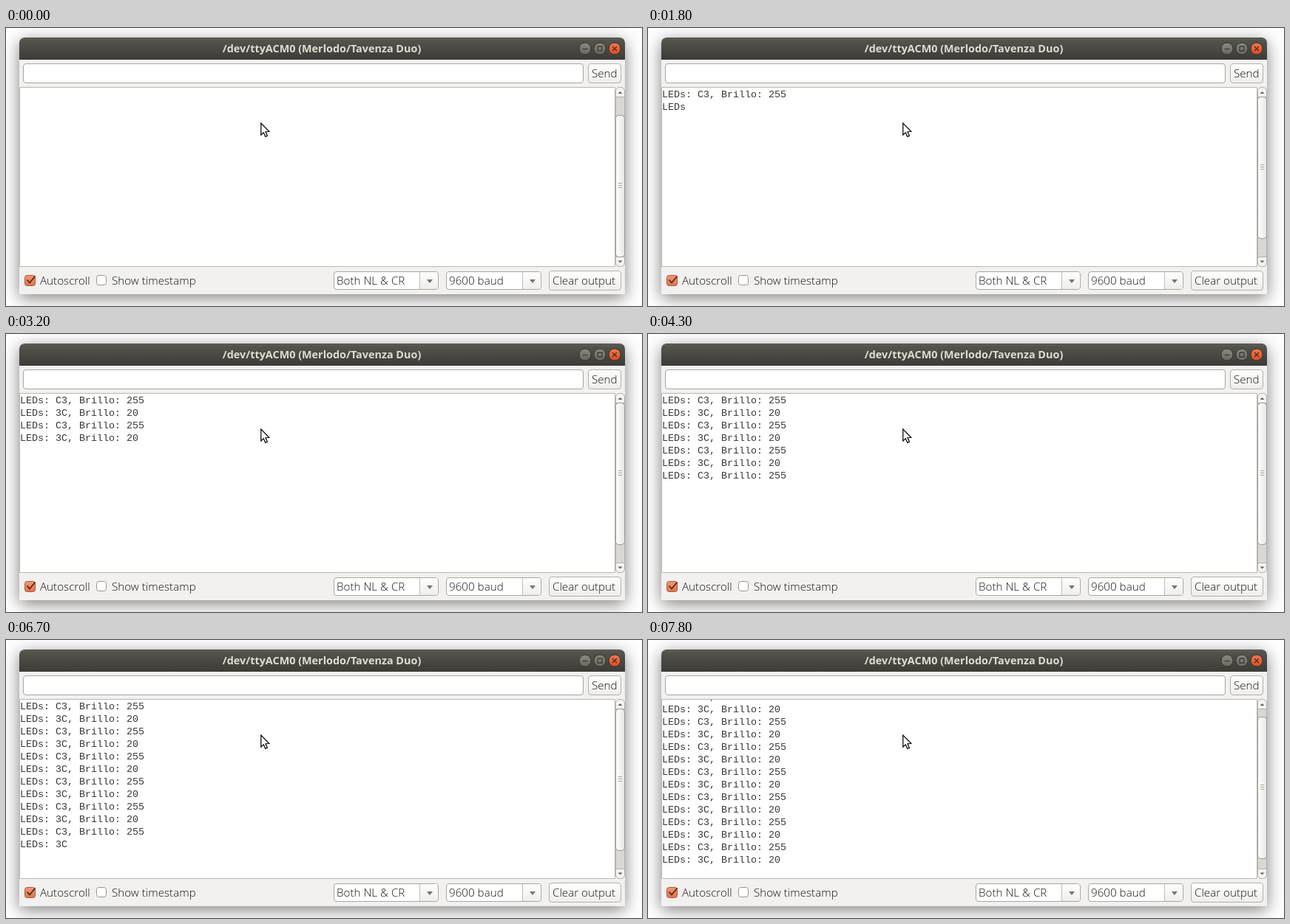
These frames come from a looping animation (860 px wide and 377 px high, 8 s). An HTML page with a canvas:

```html
<!DOCTYPE html>
<html lang="en">
<head>
<meta charset="utf-8">
<title>Serial monitor</title>
<style>
  html, body { margin: 0; width: 100%; height: 100%; overflow: hidden; background: #fff; }
  canvas { display: block; width: 860px; height: 377px; }
</style>
</head>
<body>
<canvas id="stage" width="860" height="377"></canvas>
<script>
const ctx = document.getElementById('stage').getContext('2d');
const LOOP = 8000;
const UI = '"Open Sans", "Noto Sans", sans-serif';
const MONO = '13.33px "Liberation Mono", monospace';
const BORDER = '#aaa59d';

// The board sends a line every 500 ms; a few arrive late, a few in two parts.
const LINES = 14;
const LINE_HEIGHT = 17;
const late = [1, 3, 7];
const firstPart = { 0: 'LEDs: C3,', 1: 'LEDs', 9: 'LEDs: 3C, Brillo:', 11: 'LEDs: 3C', 12: 'LEDs: C3', 13: 'LEDs: 3C' };

function lineAt(i, t) {
  const delay = late.includes(i) ? 400 : 0;
  const done = 1300 + 500 * i + delay;
  if (t >= done) return i % 2 ? 'LEDs: 3C, Brillo: 20' : 'LEDs: C3, Brillo: 255';
  return t >= done - (delay || 100) ? firstPart[i] || '' : '';
}

function vertical(y0, y1, top, bottom) {
  const g = ctx.createLinearGradient(0, y0, 0, y1);
  g.addColorStop(0, top);
  g.addColorStop(1, bottom);
  return g;
}

function box(x, y, w, h, r, fill, stroke) {
  ctx.beginPath();
  ctx.roundRect(x + 0.5, y + 0.5, w - 1, h - 1, r);
  ctx.fillStyle = fill;
  ctx.fill();
  ctx.strokeStyle = stroke;
  ctx.lineWidth = 1;
  ctx.stroke();
}

function path(points, close) {
  ctx.beginPath();
  points.forEach(([x, y]) => ctx.lineTo(x, y));
  if (close) ctx.closePath();
}

function line(color, width, ...points) {
  path(points);
  ctx.strokeStyle = color;
  ctx.lineWidth = width;
  ctx.stroke();
}

function triangle(x, y, w, h, color) {
  path([[x - w, y - h], [x + w, y - h], [x, y + h]], true);
  ctx.fillStyle = color;
  ctx.fill();
}

function label(text, x, y) {
  ctx.font = `300 15.2px ${UI}`;
  ctx.textAlign = 'left';
  ctx.fillStyle = '#161616';
  ctx.fillText(text, x, y);
}

function button(text, x, y, w) {
  box(x, y, w, 27, 3.5, vertical(y, y + 27, '#ffffff', '#eeedeb'), '#b5b0a9');
  label(text, x + 5, y + 19);
}

function combo(text, x, w) {
  const split = x + w - 26;
  box(x, 330, w, 25, 3.5, '#fff', BORDER);
  ctx.fillStyle = vertical(331, 354, '#fefefe', '#efeeec');
  ctx.fillRect(split + 1, 331, 23, 23);
  line('#c2beb8', 1, [split + 0.5, 331], [split + 0.5, 354]);
  triangle(split + 14, 343.5, 4, 2.5, '#777570');
  label(text, x + 4, 348);
}

function titleButton(x, top, bottom, ink, ...strokes) {
  ctx.beginPath();
  ctx.arc(x, 28, 8, 0, Math.PI * 2);
  ctx.fillStyle = vertical(20, 36, top, bottom);
  ctx.fill();
  ctx.strokeStyle = '#35342f';
  ctx.lineWidth = 1;
  ctx.stroke();
  for (const points of strokes) {
    line(ink, 1.3, ...points.map(([dx, dy]) => [x + dx, 28 + dy]));
  }
}

function drawTitleBar() {
  ctx.beginPath();
  ctx.roundRect(18, 13, 819, 30, [7, 7, 0, 0]);
  ctx.fillStyle = vertical(13, 43, '#57564f', '#3c3b37');
  ctx.fill();
  line('#45443f', 1, [24, 13.5], [831, 13.5]);
  line('#66655d', 1, [22, 14.5], [833, 14.5]);
  ctx.font = `bold 14.4px ${UI}`;
  ctx.textAlign = 'center';
  ctx.fillStyle = '#dfdbd2';
  ctx.fillText('/dev/ttyACM0 (Merlodo/Tavenza Duo)', 427, 33);

  const gray = ['#8b8981', '#69675f', '#3b3a36'];
  titleButton(783, ...gray, [[-3.5, 0.5], [3.5, 0.5]]);
  titleButton(803, ...gray, [[-3, -3], [3, -3], [3, 3], [-3, 3], [-3, -3]]);
  titleButton(823, '#f37b52', '#dd4c1f', '#4a2a1d', [[-3, -3], [3, 3]], [[3, -3], [-3, 3]]);
}

function drawWindow() {
  ctx.fillStyle = '#fff';
  ctx.fillRect(0, 0, 860, 377);
  ctx.save();
  ctx.shadowColor = 'rgba(0,0,0,0.5)';
  ctx.shadowBlur = 22;
  ctx.shadowOffsetY = 5;
  ctx.beginPath();
  ctx.roundRect(18, 13, 819, 348, [7, 7, 0, 0]);
  ctx.fillStyle = '#f2f1f0';
  ctx.fill();
  ctx.restore();
  drawTitleBar();

  box(23, 48, 758, 27, 3.5, '#fff', BORDER);
  button('Send', 787, 48, 45);
  box(18, 80, 806, 244, 0, '#fff', '#bbb7b0');
}

function drawFooter() {
  box(25, 335, 15, 15, 3, vertical(335, 350, '#f29a78', '#e56f47'), '#a8583c');
  line('#46291d', 1.7, [28.5, 341.5], [32, 345.5], [39.5, 336.5]);
  label('Autoscroll', 46, 348);
  box(122, 335, 14, 14, 3, '#fff', '#99948c');
  label('Show timestamp', 143, 348);
  combo('Both NL & CR', 443, 142);
  combo('9600 baud', 595, 129);
  button('Clear output', 734, 329, 98);
}

function drawScrollbar(top) {
  box(824, 80, 13, 244, 5, '#dad8d5', '#b5b1aa');
  box(824, 80, 13, 14, [5, 5, 0, 0], '#f4f3f2', '#b5b1aa');
  box(824, 310, 13, 14, [0, 0, 5, 5], '#f4f3f2', '#b5b1aa');
  triangle(830.5, 87.5, 3, -1.5, '#66645f');
  triangle(830.5, 317, 3, 1.5, '#66645f');

  const g = ctx.createLinearGradient(824, 0, 837, 0);
  g.addColorStop(0, '#ffffff');
  g.addColorStop(1, '#e9e7e5');
  box(824, top, 13, 193, 4, g, '#9d988f');
  for (let i = -1; i <= 1; i++) {
    const y = top + 95.5 + i * 3;
    line('#aaa69f', 1, [828, y], [833, y]);
  }
}

function drawOutput(lines, scroll) {
  ctx.save();
  ctx.beginPath();
  ctx.rect(19, 81, 804, 242);
  ctx.clip();
  ctx.font = MONO;
  ctx.textAlign = 'left';
  ctx.fillStyle = '#383838';
  lines.forEach((text, i) => ctx.fillText(text, 19, 94 + i * LINE_HEIGHT - scroll));
  ctx.restore();
}

function drawPointer() {
  path([[344.8, 129], [344.8, 145], [348.3, 141.8], [350.8, 147.3],
        [353.4, 146.2], [351, 140.7], [355.8, 140.3]], true);
  ctx.fillStyle = '#fff';
  ctx.fill();
  ctx.strokeStyle = '#111';
  ctx.lineWidth = 1.3;
  ctx.stroke();
}

function draw(now) {
  const t = now % LOOP;
  const lines = Array.from({ length: LINES }, (_, i) => lineAt(i, t)).filter(Boolean);
  const scroll = lines.length === LINES ? 13 : 0;
  const thumb = lines.length === 0 ? 118 : scroll ? 104 : 93;
  drawWindow();
  drawOutput(lines, scroll);
  drawScrollbar(thumb);
  drawFooter();
  drawPointer();
}

let start;
function tick(now) {
  start ??= now;
  draw(now - start);
  requestAnimationFrame(tick);
}
draw(0);
requestAnimationFrame(tick);
</script>
</body>
</html>
```
